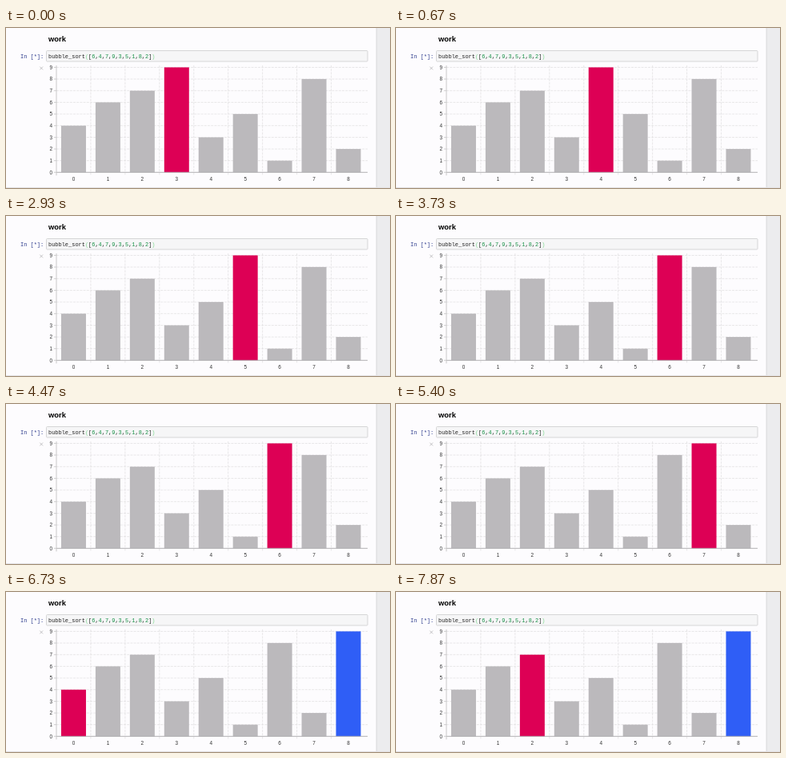
Write an HTML page that moves like this. It is 480 px wide and 201 px high and loops after 8 s.

```html
<!DOCTYPE html>
<html lang="en">
<head>
<meta charset="utf-8">
<title>Bubble sort</title>
<style>
  html, body { margin: 0; width: 100%; height: 100%; overflow: hidden; background: #fdfcfe; }
  svg { display: block; width: 480px; height: 201px; }
  text { font-family: "Liberation Sans", Arial, sans-serif; fill: #333; white-space: pre; }
  .code { font: 6.95px "Liberation Mono", "Courier New", monospace; fill: #222; }
  .num { fill: #159045; }
  .match { fill: #7fd88f; }
  .axis text { font-size: 6.4px; }
  .grid { stroke: #e2e1e3; stroke-width: .8; stroke-dasharray: 3 1.2; }
</style>
</head>
<body>
<svg id="stage" viewBox="0 0 480 201">
  <rect width="480" height="201" fill="#fdfcfe"/>
  <rect x="463" width="17" height="201" fill="#ececee"/>
  <rect x="462.5" width="1.5" height="201" fill="#e0dfe2"/>
  <rect y="200" width="480" height="1" fill="#e4e3e6"/>
  <text x="53" y="17" font-size="9.4" font-weight="bold" style="fill:#000">work</text>
  <text class="code" x="18" y="38" style="fill:#2b3a8c">In [*]:</text>
  <rect x="50.5" y="28.5" width="401.5" height="13.5" rx="1" fill="#f6f6f7" stroke="#d2d2d3" stroke-width=".9"/>
  <text class="code" id="code" x="53" y="37.7"></text>
  <path d="M42.3 48.6l3.8 3.8m0-3.8l-3.8 3.8" stroke="#b4b3b6" stroke-width=".8"/>
  <g id="grid"></g>
  <g id="bars"></g>
  <g id="axis" class="axis"></g>
</svg>
<script>
const NS = 'http://www.w3.org/2000/svg';
const LOOP = 8000;
const LEFT = 63, RIGHT = 452, BASE = 181.3, UNIT = 14.65, STEP = 42.94, BAR = 31;
const GREY = '#bbb9bc', RED = '#dd0055', BLUE = '#2f5ef6';
const START = [4, 6, 7, 9, 3, 5, 1, 8, 2];

// Each step: time, action, index
const STEPS = [
  [0, 'look', 3],
  [130, 'swap', 3], [660, 'look', 4],
  [1670, 'swap', 4], [2200, 'look', 5],
  [3130, 'swap', 5], [3700, 'look', 6],
  [4670, 'swap', 6], [5180, 'look', 7],
  [6130, 'swap', 7], [6620, 'look', 0],
  [7070, 'look', 1], [7600, 'look', 2]
];

const byId = id => document.getElementById(id);

function add(parent, tag, attrs, content) {
  const el = document.createElementNS(NS, tag);
  for (const key in attrs) el.setAttribute(key, attrs[key]);
  if (content !== undefined) el.textContent = content;
  parent.appendChild(el);
  return el;
}

function drawCode() {
  for (const ch of 'bubble_sort([6,4,7,9,3,5,1,8,2])') {
    const kind = /\d/.test(ch) ? 'num' : /[()]/.test(ch) ? 'match' : '';
    add(byId('code'), 'tspan', { class: kind }, ch);
  }
}

function drawAxes() {
  const grid = byId('grid'), axis = byId('axis');
  for (let v = 0; v <= 9; v++) {
    const y = BASE - v * UNIT;
    if (v) add(grid, 'line', { class: 'grid', x1: LEFT, x2: RIGHT, y1: y, y2: y });
    add(axis, 'line', { x1: LEFT - 3, x2: LEFT, y1: y, y2: y, stroke: '#bbb', 'stroke-width': .7 });
    add(axis, 'text', { x: 58, y: y + 2.3, 'text-anchor': 'end' }, v);
  }
  START.forEach((_, i) => {
    const x = LEFT + i * STEP;
    if (i) add(grid, 'line', { class: 'grid', x1: x, x2: x, y1: 47, y2: BASE + 4 });
    add(axis, 'text', { x: x + STEP / 2, y: 192.2, 'text-anchor': 'middle' }, i);
  });
  add(axis, 'line', { x1: LEFT, x2: RIGHT, y1: BASE, y2: BASE, stroke: '#aaa9ab', 'stroke-width': .9 });
  add(axis, 'line', { x1: LEFT, x2: LEFT, y1: 47, y2: BASE + 4, stroke: '#c4c3c5', 'stroke-width': .9 });
}

const bars = START.map((_, i) =>
  add(byId('bars'), 'rect', { x: LEFT + i * STEP + (STEP - BAR) / 2, width: BAR }));

function stateAt(t) {
  const values = START.slice();
  const colors = values.map(() => GREY);
  let current = 3;
  for (const [time, action, i] of STEPS) {
    if (time > t) break;
    // a fresh pass leaves the sorted bar blue
    if (i !== 0) colors[current] = GREY;
    if (action === 'swap') {
      [values[i], values[i + 1]] = [values[i + 1], values[i]];
      current = i + 1;
      colors[current] = BLUE;
    } else {
      current = i;
      colors[i] = RED;
    }
  }
  return { values, colors };
}

function render(t) {
  const { values, colors } = stateAt(t);
  bars.forEach((bar, i) => {
    const h = values[i] * UNIT;
    bar.setAttribute('y', BASE - h);
    bar.setAttribute('height', h);
    bar.setAttribute('fill', colors[i]);
  });
}

let begin;
function tick(now) {
  if (begin === undefined) begin = now;
  render((now - begin) % LOOP);
  requestAnimationFrame(tick);
}

drawCode();
drawAxes();
render(0);
requestAnimationFrame(tick);
</script>
</body>
</html>
```
